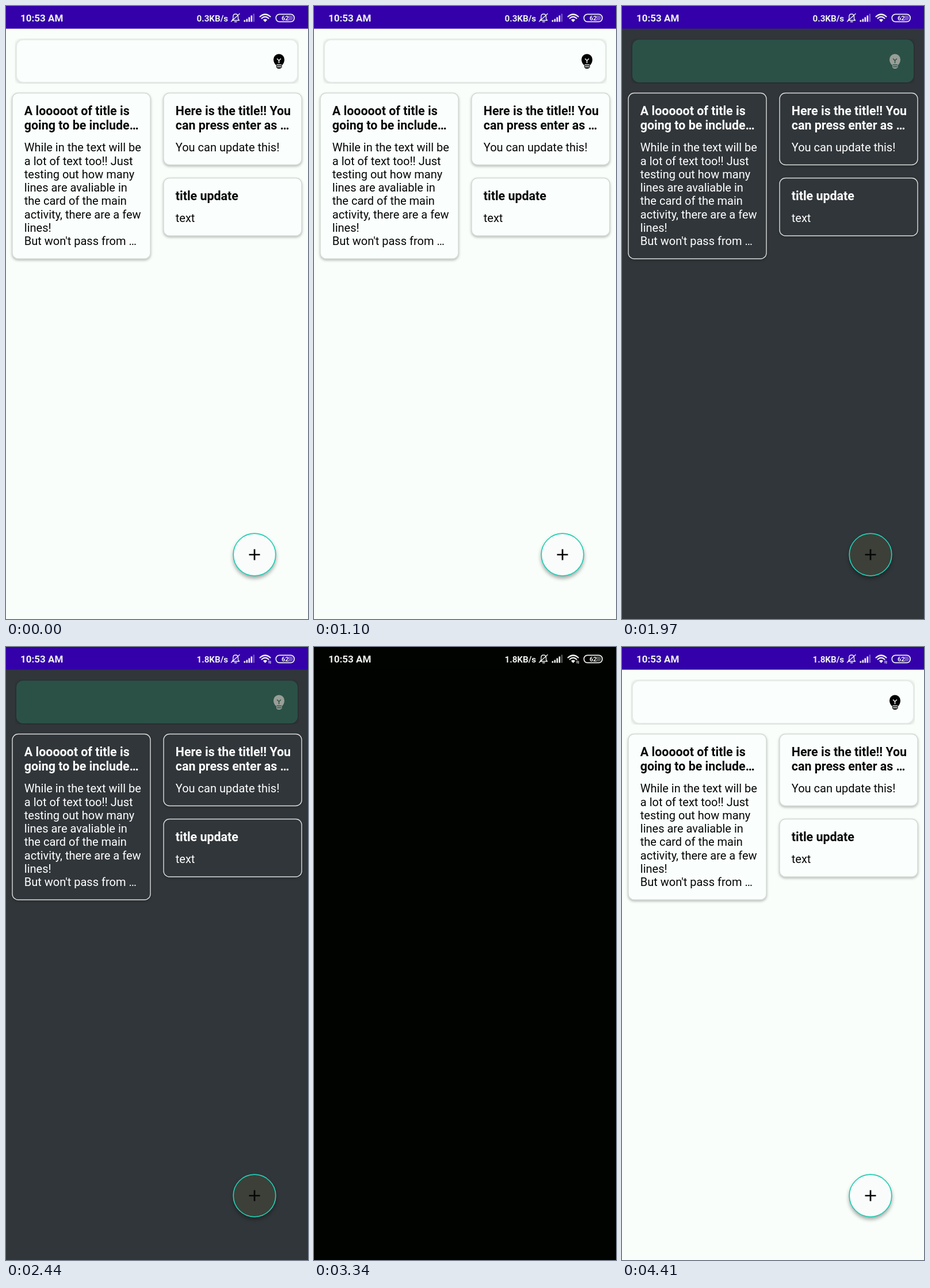
Animation, 525 px wide and 1067 px high, one loop 4440 ms. Source, as an HTML page:

```html
<!DOCTYPE html>
<html lang="en">
<head>
<meta charset="utf-8">
<title>Notes theme switch</title>
<style>
html, body { margin: 0; width: 100%; height: 100%; overflow: hidden; }
svg {
  display: block; width: 525px; height: 1067px;
  font-family: Roboto, sans-serif;
  --bar: #3300aa; --bg: #f9fefa; --ink: #050706; --card: #fafefc; --line: #d3dad6;
  --search: #fafefc; --edge: #e5ebe7; --bulb: #000; --fab: #fafcfb; --soft: #0004; --wide: #0003;
}
svg.dark {
  --bg: #31363a; --ink: #fff; --card: #31363a; --line: #dcdedd;
  --search: #2b5147; --edge: none; --bulb: #999e97; --fab: #3c4039; --soft: #0003; --wide: #0000;
}
svg.settled { --wide: #0005; }
svg.black { --bar: #010301; --bg: #010301; }
svg.black #app { display: none; }
#page { fill: var(--bg); }
#top { fill: var(--bar); }
#status { fill: #f0f2ee; stroke: #f0f2ee; }
#status text { stroke: none; font-weight: 600; }
.line { fill: none; stroke-linecap: round; stroke-linejoin: round; }
.card rect { fill: var(--card); stroke: var(--line); stroke-width: 1.4; filter: drop-shadow(0 2px 2px var(--soft)); }
.card text { fill: var(--ink); font-size: 20px; }
.card .title { font-size: 21.4px; font-weight: 700; }
#search { fill: var(--search); stroke: var(--edge); stroke-width: 2; filter: drop-shadow(0 1px 3px var(--wide)); }
#bulb { fill: var(--bulb); }
#bulb .line { stroke: var(--search); stroke-width: 1.5; }
#fab { fill: var(--fab); stroke: #20cfb4; stroke-width: 1.7; filter: drop-shadow(0 4px 3px #0005); }
</style>
</head>
<body>
<svg id="stage" viewBox="0 0 525 1067">
  <clipPath id="searchClip"><rect x="15.5" y="56.5" width="493.5" height="78.5"/></clipPath>
  <rect id="page" width="525" height="1067"/>
  <rect id="top" width="525" height="39.5"/>
  <g id="status">
    <text x="25" y="27" font-size="17">10:53 AM</text>
    <text id="speed" x="331.5" y="27" font-size="15.2"></text>
    <path class="line" stroke-width="1.4" d="M393 25H405.5L403.5 22.5V18.5Q403.5 14 399 14Q394.8 14 394.8 18.5V22.5ZM397.5 27.5H401M391.5 27L406 13.5"/>
    <g id="bars" stroke="none"></g>
    <path class="line" stroke-width="2.2" stroke-linecap="butt" d="M441.5 18.5Q450.5 10.5 459.5 18.5M444.5 21.5Q450.5 16 456.5 21.5"/>
    <path stroke="none" d="M446.8 24Q450.5 21 454.2 24L450.5 28Z"/>
    <path id="traffic" class="line" stroke-width="1.2" d="M457.3 28V24M459.8 24.5V28.5"/>
    <rect x="469.3" y="14.3" width="31.8" height="13" rx="6" fill="none" stroke-width="1.7"/>
    <path stroke="none" opacity=".35" d="M491 16.5H495Q499 16.5 499 20.8T495 25H491Z"/>
    <text x="479" y="25" font-size="11">62</text>
  </g>
  <g id="app">
    <g clip-path="url(#searchClip)"><rect id="search" x="18" y="58.5" width="489" height="74.5" rx="12"/></g>
    <g id="bulb">
      <path d="M470 103.5Q465 99 465 93A9.5 9.5 0 0 1 484 93Q484 99 479.5 103.5V107L476.5 109H472.5L470 107Z"/>
      <path class="line" d="M471.5 92L474.5 95L477.5 92M474.5 95V99M471 102.5H478.5M471.5 105.7H478"/>
    </g>
    <g id="cards"></g>
    <circle id="fab" cx="432" cy="955" r="36.8"/>
    <path d="M422.5 955H441.5M432 945.5V964.5" stroke="#050706" stroke-width="2.7"/>
  </g>
</svg>
<script>
const LOOP = 4440;
const $ = id => document.getElementById(id);
const stage = $("stage");

const cards = [
  { x: 11, y: 151.5, h: 288.5, title: ["A looooot of title is", "going to be include…"],
    body: ["While in the text will be", "a lot of text too!! Just", "testing out how many", "lines are avaliable in",
           "the card of the main", "activity, there are a few", "lines!", "But won't pass from …"] },
  { x: 274, y: 151.5, h: 125, title: ["Here is the title!! You", "can press enter as …"], body: ["You can update this!"] },
  { x: 274, y: 299.5, h: 100.5, title: ["title update"], body: ["text"] }
];

const lines = (texts, x, y, step, cls) =>
  texts.map((s, i) => `<text class="${cls}" x="${x}" y="${y + i * step}">${s}</text>`).join("");

$("cards").innerHTML = cards.map(({ x, y, h, title, body }) => `<g class="card">
  <rect x="${x}" y="${y}" width="240" height="${h}" rx="10"/>
  ${lines(title, x + 20.8, y + 38.5, 25.2, "title")}
  ${lines(body, x + 20.8, y + 51.3 + title.length * 25.2, 23.3, "body")}</g>`).join("");

$("bars").innerHTML = [3, 5, 8, 11, 14].map((h, i) =>
  `<rect x="${413.5 + i * 4}" y="${27.5 - h}" width="2.6" height="${h}" opacity="${i < 4 ? 1 : .35}"/>`).join("");

const between = (t, a, b) => t >= a && t < b;

function draw(now) {
  const t = now % LOOP;
  const busy = t >= 2150;
  stage.classList.toggle("black", between(t, 1140, 1300) || between(t, 3270, 3430));
  stage.classList.toggle("dark", between(t, 1300, 3270));
  stage.classList.toggle("settled", between(t, 1700, 3270));
  $("speed").textContent = busy ? "1.8KB/s" : "0.3KB/s";
  $("traffic").style.display = busy ? "" : "none";
  requestAnimationFrame(draw);
}
draw(performance.now());
</script>
</body>
</html>
```
